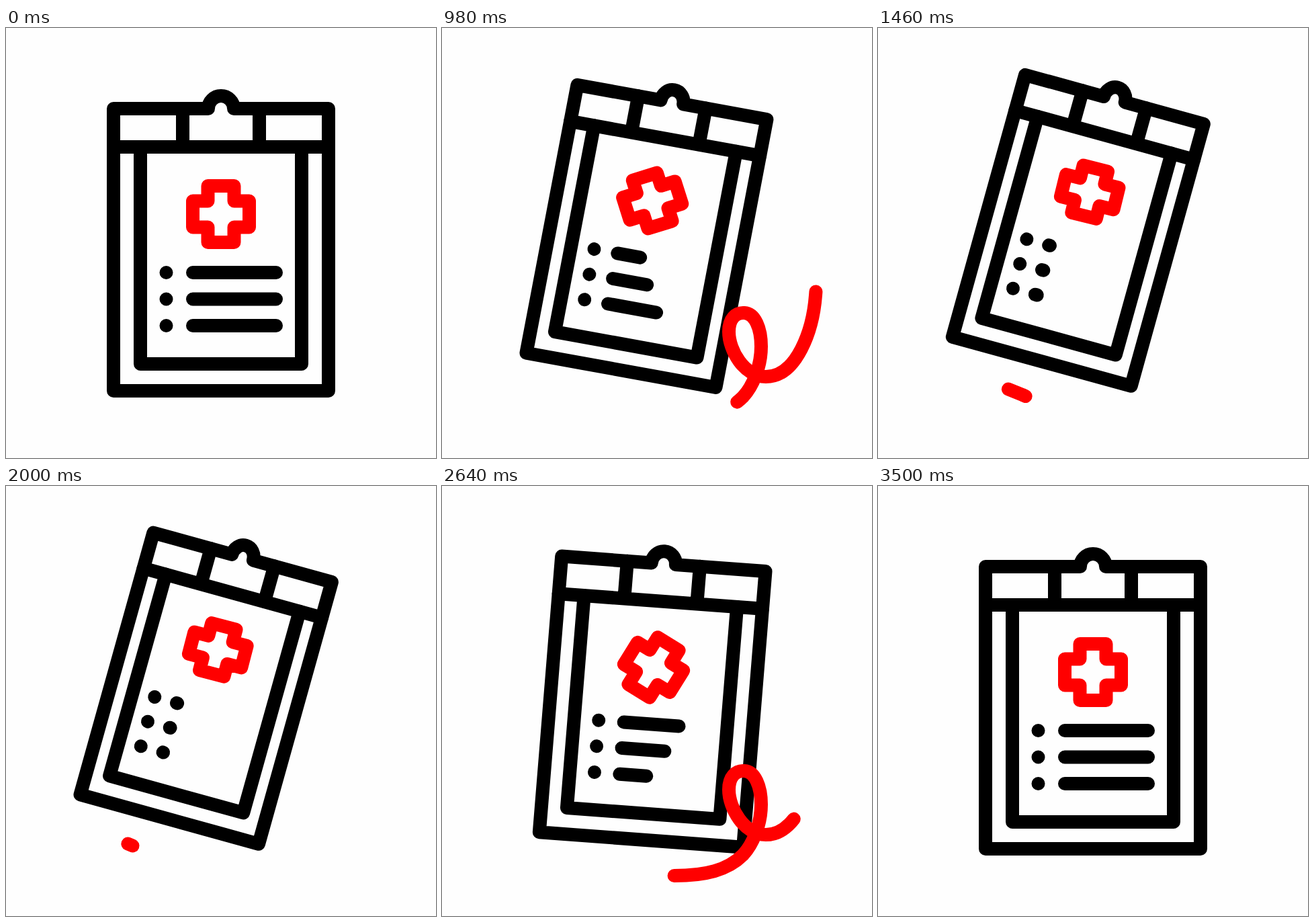
Recreate the animation shown at these times as an HTML page. Size 640 px wide and 640 px high, loop 3600 ms.

```html
<!DOCTYPE html>
<html lang="en">
<head>
<meta charset="utf-8">
<title>Medical clipboard</title>
<style>
  html, body { margin: 0; width: 100%; height: 100%; overflow: hidden; background: #fefefe; }
  svg { display: block; }
  path { fill: none; stroke: #000; stroke-width: 20; stroke-linecap: round; stroke-linejoin: round; vector-effect: non-scaling-stroke; }
  .red { stroke: #f00; }
</style>
</head>
<body>
<svg width="640" height="640">
  <g id="board">
    <path d="M160 120H301A19 19 0 0 1 339 120H480V540H160Z"/>
    <path d="M160 177H480M263 120V177M377 120V177"/>
    <path d="M200 177V500H440V177"/>
    <path d="M238.5 364h.01M238.5 403.5h.01M238.5 443h.01"/>
    <path class="bar"/>
    <path class="bar"/>
    <path class="bar"/>
  </g>
  <path id="cross" class="red" d="M-19.5 -42H19.5V-19.5H42V19.5H19.5V42H-19.5V19.5H-42V-19.5H-19.5Z"/>
  <path id="trail" class="red" pathLength="1" d="M546.5 237C554 285 561 340 556 398C552 450 528 519 482 519
    C450 519 427 480 427 452C427 433 437 423 450 424C466 425 475 447 475 474C475 505 462 534 448 549
    C425 572 392 580 346 580C310 580 255 564 215 546L180 532"/>
</svg>
<script>
  const LOOP = 3600, TURN = 1754;
  const board = document.getElementById('board');
  const cross = document.getElementById('cross');
  const trail = document.getElementById('trail');
  const bars = [...document.querySelectorAll('.bar')];

  // Symmetric cubic-bezier(k, 0, 1 - k, 1)
  function ease(x, k) {
    if (x <= 0) return 0;
    if (x >= 1) return 1;
    let lo = 0, hi = 1;
    for (let i = 0; i < 30; i++) {
      const s = (lo + hi) / 2, q = 1 - s;
      if (3 * q * q * s * k + 3 * q * s * s * (1 - k) + s * s * s < x) lo = s;
      else hi = s;
    }
    return lo * lo * (3 - 2 * lo);
  }

  // 0 = upright, 1 = fully tilted
  const tilt = t => t < TURN
    ? ease((t - 121) / 1638, 0.91)
    : 1 - ease((t - 1749) / 1700, 0.92);

  // Column vectors of the tilted board
  const skew = p => [1 - 0.172 * p, 0.232 * p, -0.262 * p, 1 - 0.0727 * p];

  function draw(t) {
    const p = tilt(t);
    const m = skew(p).join(' ');

    board.setAttribute('transform',
      `matrix(${m} ${160 + 60 * p} ${120 - 51 * p}) translate(-160 -120)`);

    bars.forEach((bar, i) => {
      const len = Math.max(0.01, 124 * (1 - tilt(t - 36 * i)));
      bar.setAttribute('d', `M278 ${364 + 39.5 * i}h${len}`);
    });

    const bend = p * (1 - p);
    const x = 320 - 4.6 * p - 17 * bend;
    const y = 277 - 33.6 * p + 15 * bend;
    cross.setAttribute('transform',
      `translate(${x} ${y}) rotate(${90 * p}) matrix(${m} 0 0)`);

    const late = tilt(t - (t < TURN + 80 ? 162 : 145));
    const from = Math.min(p, late), len = Math.abs(p - late);
    trail.style.visibility = len > 0.0013 ? 'visible' : 'hidden';
    trail.style.strokeDasharray = `${len} 2`;
    trail.style.strokeDashoffset = -from;
  }

  const start = performance.now();
  function tick() {
    draw((performance.now() - start) % LOOP);
    requestAnimationFrame(tick);
  }
  draw(0);
  requestAnimationFrame(tick);
</script>
</body>
</html>
```
